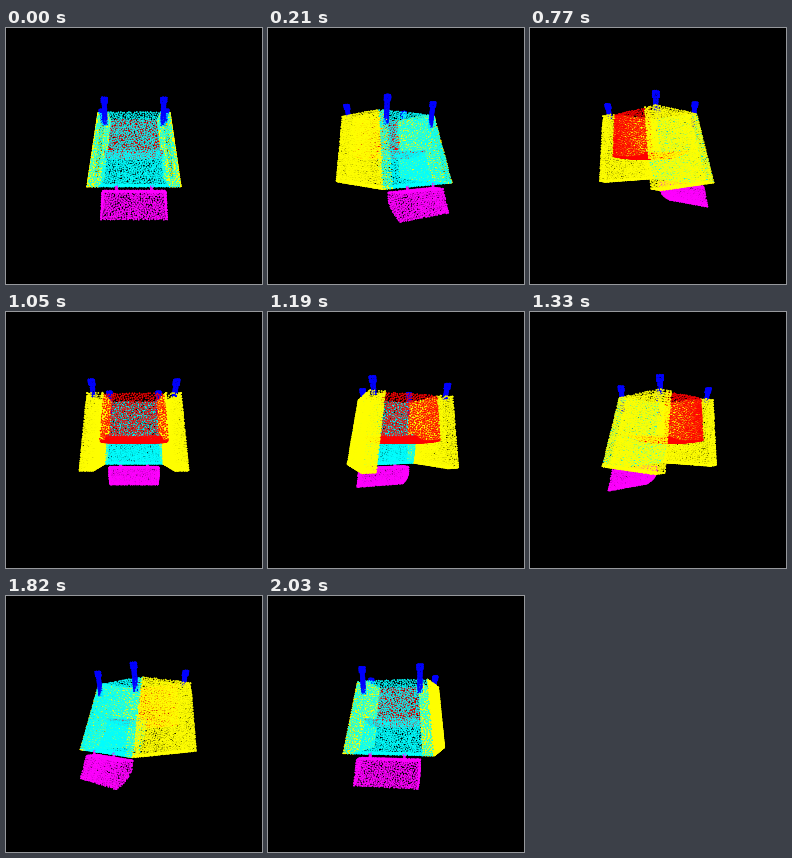
A matplotlib script for the animation above (2100 ms loop, 256 px wide and 256 px high).

```python
import numpy as np
import matplotlib.pyplot as plt
from matplotlib.animation import FuncAnimation

SIZE = 256
FRAMES = 30
CAM = 260            # camera distance, also the focal length in pixels
CX, CY = 128, 126
RADIUS = 1.28        # splat radius in pixels
DENSITY = 0.27       # points per unit of surface

RED, YELLOW, CYAN = (1, 0, 0), (1, 1, 0), (0, 1, 1)
MAGENTA, BLUE = (1, 0, 1), (0, 0, 1)

rng = np.random.default_rng(4)
cloud, paint = [], []


def lerp(a, b, t):
    return a + (b - a) * t


def spread(pts, n):
    """Pick n points that lie as far from each other as possible."""
    pick = np.zeros(n, int)
    gap = np.full(len(pts), np.inf)
    for i in range(1, n):
        d = pts - pts[pick[i - 1]]
        gap = np.minimum(gap, np.einsum("ij,ij->i", d, d))
        pick[i] = gap.argmax()
    return pts[pick]


def patch(color, area, surface, density=DENSITY):
    """Cover surface(u, v) with evenly spaced points."""
    n = int(area * density)
    u, v = rng.random((2, 6 * n))
    pts = np.stack(np.broadcast_arrays(*surface(u, v)), axis=1)
    cloud.append(spread(pts, n))
    paint.append(np.tile(color, (n, 1)))


def height(t):
    return -38.7 + 66.7 * t


def back_z(t):
    return 20 + 17.5 * t


def arm(side):
    def at(t, s, k):
        outer = lerp(40 + 6.6 * t, 33 + 7.2 * t, s)
        inner = lerp(27 + 8 * t, 25 + 6 * t, s)
        return side * lerp(inner, outer, k), height(t), lerp(-39, back_z(t), s)

    patch(YELLOW, 4600, lambda u, v: at(u, v, 1))
    patch(YELLOW, 4600, lambda u, v: at(u, v, 0))
    patch(YELLOW, 850, lambda u, v: at(u, 0, v))
    patch(YELLOW, 900, lambda u, v: at(1, u, v))


def seat():
    def front(u, v):
        x = 2 * u - 1
        return x * (27 + 3 * v), lerp(-38.7, 3 - x**2, v), -35.5 + 2 * x**2

    def top(u, v):
        x = 2 * u - 1
        return x * 29.5, 3 + 11 * v - 16 * v**2 - x**2, -34.5 + 46.5 * v

    patch(RED, 2500, front)
    patch(RED, 2900, top)


def back():
    def outer(u, t):
        return (2 * u - 1) * (32.6 + 7.2 * t), height(t), back_z(t)

    def inner(u, v):
        t = lerp(0.53, 1, v)
        return (2 * u - 1) * (25 + 6 * t), height(t), 11 + 11 * v**1.5

    def edge(u, v):
        return (2 * u - 1) * 31, 28, lerp(22, 37, v)

    patch(CYAN, 5300, outer)
    patch(CYAN, 1900, inner)
    patch(CYAN, 850, edge)


def headrest():
    def at(x, v, k):
        rear, face = 38 + 6.5 * v, 26 + 17 * v**2.5
        return x * 27.5, 32.8 + 21.7 * v, lerp(face, rear, k)

    patch(MAGENTA, 1300, lambda u, v: at(2 * u - 1, v, 1))
    patch(MAGENTA, 1400, lambda u, v: at(2 * u - 1, v, 0))
    patch(MAGENTA, 650, lambda u, v: at(2 * u - 1, 0, v))
    for side in (-1, 1):
        patch(MAGENTA, 210, lambda u, v: at(side, u, v))
        patch(MAGENTA, 50, lambda u, v: (side * 15.2 + 2 * u - 1,
                                         27 + 6 * v, 37))


def leg(x, z, drift, y0, y1):
    """Round leg with a thicker foot; drift is its lean towards the body."""
    def at(u, v):
        r = 1.7 + 0.9 * (v < 4.5 / (y1 - y0))
        a = 2 * np.pi * u
        return (x + drift[0] * v + r * np.cos(a), lerp(y0, y1, v),
                z + drift[1] * v + r * np.sin(a))

    def cap(u, v):
        r, a = 2.6 * np.sqrt(v), 2 * np.pi * u
        return x + r * np.cos(a), y0, z + r * np.sin(a)

    patch(BLUE, 12 * (y1 - y0), at, 0.55)
    patch(BLUE, 21, cap, 0.55)


for side in (-1, 1):
    arm(side)
    leg(side * 37, -35.5, (-side * 2, 1.5), -50.3, -36)
    leg(side * 27, 25, (-side * 0.5, -3.5), -50.8, -26.5)
seat()
back()
headrest()

points = np.concatenate(cloud)
colors = np.concatenate(paint).astype(float)


def render(angle):
    x, y, z = points.T
    c, s = np.cos(angle), np.sin(angle)
    depth = CAM - (z * c - x * s)
    scale = CAM / depth
    px = CX + (x * c + z * s) * scale
    py = CY + y * scale

    # One fragment for every pixel centre a splat may cover.
    off = np.arange(-1, 2)
    dx, dy = (g.ravel() for g in np.meshgrid(off, off))
    col = np.floor(px).astype(int)[:, None] + dx
    row = np.floor(py).astype(int)[:, None] + dy
    d2 = (col + 0.5 - px[:, None])**2 + (row + 0.5 - py[:, None])**2
    alpha = 1 - d2 / RADIUS**2
    who, k = np.nonzero(alpha > 0)
    alpha = np.minimum(alpha[who, k], 0.999)
    pix = row[who, k] * SIZE + col[who, k]

    # Front-to-back compositing inside each pixel.
    order = np.lexsort((depth[who], pix))
    who, alpha, pix = who[order], alpha[order], pix[order]
    fade = np.log(1 - alpha)
    before = np.cumsum(fade) - fade
    first = np.searchsorted(pix, pix)
    weight = alpha * np.exp(before - before[first])
    img = [np.bincount(pix, weight * ch, SIZE * SIZE) for ch in colors[who].T]
    return np.clip(np.stack(img, axis=1), 0, 1).reshape(SIZE, SIZE, 3)


fig = plt.figure(figsize=(2.56, 2.56), dpi=100, facecolor="black")
ax = fig.add_axes([0, 0, 1, 1])
ax.axis("off")
view = ax.imshow(render(0), interpolation="nearest", aspect="auto")


def update(i):
    view.set_data(render(2 * np.pi * i / FRAMES))
    return [view]


anim = FuncAnimation(fig, update, frames=FRAMES, interval=70, repeat=True,
                     repeat_delay=0, blit=False)
plt.show()
```
